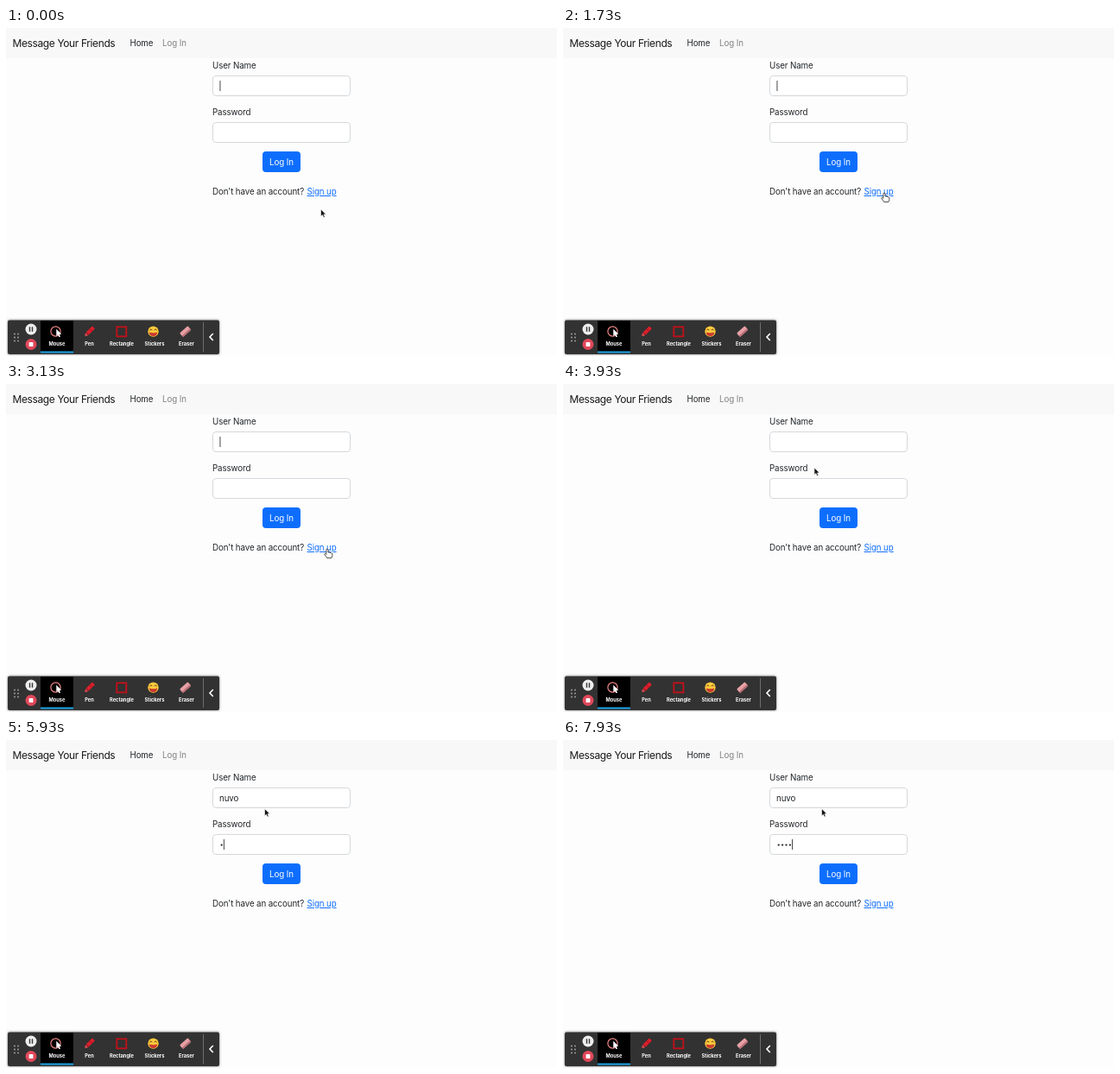
These frames come from a looping animation (638 px wide and 380 px high, 8000 ms). An HTML page:

```html
<!DOCTYPE html>
<html lang="en">
<head>
<meta charset="utf-8">
<title>Message Your Friends</title>
<style>
  html, body { margin: 0; width: 100%; height: 100%; overflow: hidden; background: #fdfdfd; }
  svg { display: block; width: 638px; height: 380px; }
  text { font: 9.75px Inter, "Liberation Sans", sans-serif; letter-spacing: -.11px; fill: #212529; }
  .brand { font-size: 12px; letter-spacing: -.38px; fill: #1a1a1a; }
  .link { fill: #0d6efd; text-decoration: underline; }
  .button rect { fill: #0d6efd; }
  .button text { fill: #fff; text-anchor: middle; }
  .field { fill: #fff; stroke: #d0d4d8; }
  .focus .field { stroke: #86b7fe; }
  .ring { fill: none; stroke: #c2d9fd; stroke-width: 3; visibility: hidden; }
  .focus .ring { visibility: visible; }
  .tools text { font-size: 5.7px; font-weight: 700; letter-spacing: 0; fill: #fff; text-anchor: middle; }
</style>
</head>
<body>
<svg viewBox="0 0 638 380">
  <defs>
    <filter id="shadow" x="-10%" y="-30%" width="120%" height="160%">
      <feDropShadow dx="0" dy="0" stdDeviation="1.5" flood-opacity=".5"/>
    </filter>
    <g id="field">
      <rect class="ring" x="-1.5" y="-1.5" width="163" height="27" rx="5"/>
      <rect class="field" x=".5" y=".5" width="159" height="23" rx="3.5" stroke-width=".9"/>
    </g>
    <path id="pointer" d="M0 0V8.3L1.9 6.5L3.2 9.4L4.7 8.7L3.4 5.9H6Z"/>
  </defs>

  <rect width="638" height="380" fill="#fdfdfd"/>
  <rect width="638" height="35" fill="#f8f8f8"/>
  <text class="brand" x="7.5" y="22">Message Your Friends</text>
  <text x="143.5" y="21.4">Home</text>
  <text x="181" y="21.4" style="fill:#808284">Log In</text>

  <text id="nameLabel" x="239" y="46.5"></text>
  <text x="239" y="100.5">Password</text>
  <g id="nameField" transform="translate(239 55)"><use href="#field"/></g>
  <g id="passField" transform="translate(239 109)"><use href="#field"/></g>
  <text id="name" x="247" y="70.6"></text>
  <g id="dots" fill="#212529"></g>
  <rect id="caret" width=".9" height="12" fill="#333"/>

  <g id="login">
    <g class="button">
      <rect x="297" y="143" width="44" height="24" rx="4"/>
      <text x="319" y="158.7">Log In</text>
    </g>
    <text x="239" y="193">Don't have an account?</text>
    <text class="link" x="348.5" y="193">Sign up</text>
  </g>
  <g id="signup">
    <g class="button">
      <rect x="293" y="143" width="52" height="24" rx="4"/>
      <text x="319" y="158.7">Sign Up</text>
    </g>
    <text x="239" y="193">Already have an account?</text>
    <text class="link" x="358.5" y="193">Log in</text>
  </g>

  <g class="tools">
    <rect x="2" y="338.5" width="245" height="39.5" rx="2" fill="#303030" filter="url(#shadow)"/>
    <path d="M10 354.5h0m4 0h0M10 358.5h0m4 0h0M10 362.5h0m4 0h0" stroke="#aaa" stroke-width="1.8" stroke-linecap="round"/>
    <circle cx="29" cy="349" r="6.5" fill="#eee"/>
    <path d="M27.5 346.3v5.4M30.5 346.3v5.4" stroke="#333" stroke-width="1.4"/>
    <circle cx="29" cy="366.5" r="6.5" fill="#e0485a"/>
    <rect x="26.6" y="364.1" width="4.8" height="4.8" rx=".6" fill="#fff"/>

    <rect x="40" y="339" width="38" height="37" fill="#000"/>
    <rect x="40" y="374.5" width="38" height="2" fill="#1ba0e2"/>
    <circle cx="57.5" cy="351.5" r="5.6" fill="none" stroke="#ef8585" stroke-width="1.2"/>
    <use href="#pointer" x="58.3" y="348.8" fill="#fff"/>

    <g transform="translate(96.5 351.8) rotate(-45)">
      <rect x="-3.5" y="-2.2" width="10.5" height="4.4" rx="1" fill="#d9202c"/>
      <path d="M-4 -2.2L-7.5 0L-4 2.2Z" fill="#e84a50"/>
      <path d="M-3.2 -2.2v4.4M2.5 -2.2v4.4" stroke="#8d0d16" stroke-width=".8"/>
    </g>
    <rect x="128.3" y="346.3" width="11" height="11" fill="none" stroke="#c3101a" stroke-width="1.8"/>

    <circle cx="170.5" cy="351.6" r="6.2" fill="#fbc93d"/>
    <path d="M165.8 352.5q4.7 1.6 9.4 0q-.6 4.6-4.7 4.6t-4.7-4.6Z" fill="#c8392f"/>
    <path d="M166.4 350q1.4-2 2.8 0M171.8 350q1.4-2 2.8 0" fill="none" stroke="#5a3510" stroke-width=".9"/>

    <g transform="translate(207.7 351.6) rotate(-42)">
      <rect x="-6.3" y="-3" width="12.6" height="6" rx="1.2" fill="#e7a0a5"/>
      <rect x="-6.3" y="1" width="12.6" height="2" rx="1" fill="#b96d75"/>
    </g>

    <text x="59" y="368">Mouse</text>
    <text x="96.5" y="368">Pen</text>
    <text x="134" y="368">Rectangle</text>
    <text x="172" y="368">Stickers</text>
    <text x="209" y="368">Eraser</text>
    <path d="M228.5 341v34" stroke="#777" stroke-width=".9"/>
    <path d="M239.8 354L236 358L239.8 362" fill="none" stroke="#fff" stroke-width="1.6"/>
  </g>

  <g id="cursor">
    <use id="arrow" href="#pointer" fill="#111" stroke="#fff" stroke-width=".6"/>
    <path id="hand" fill="#fff" stroke="#222" stroke-width=".8" stroke-linejoin="round"
      d="M-1.1 5.6V1Q-1 0 0 0T1 1V4Q2.5 3.5 3 4.4Q4.3 4 4.6 5Q5.8 4.8 5.8 6V7.6Q5.8 9 4.8 10.6H-.3Q-1 9-3 6.9Q-3.6 5.8-2.7 5.4Q-2 5.2-1.1 6.4Z"/>
    <path id="beam" fill="none" stroke="#333" stroke-width=".8" d="M-1.8-5Q0-5 0-4Q0-5 1.8-5M0-4V4M-1.8 5Q0 5 0 4Q0 5 1.8 5"/>
  </g>
</svg>
<script>
const LOOP = 8000, BLINK = 512, USER = "nuvo";
const pageTurns = [0, 660, 1530, 2200, 2930];   // login and sign-up alternate
const nameKeys = [5070, 5130, 5260, 5400];
const passKeys = [5920, 6120, 6400, 6590];
const TAB = 5660;
const path = [[0, 364.5, 210], [60, 364.5, 210], [600, 372, 191], [3440, 372, 191],
              [3930, 291, 97], [4330, 299.5, 79.7], [LOOP, 299.5, 79.7]];

const $ = id => document.getElementById(id);
const show = (id, on) => $(id).style.visibility = on ? "visible" : "hidden";
const within = (x, y, left, top, right, bottom) => x >= left && x <= right && y >= top && y <= bottom;
const passed = (times, t) => times.filter(k => k <= t);

const dots = passKeys.map((_, i) => {
  const dot = document.createElementNS("http://www.w3.org/2000/svg", "circle");
  dot.setAttribute("cx", 249.7 + 4.4 * i);
  dot.setAttribute("cy", 121.6);
  dot.setAttribute("r", 1.15);
  return $("dots").appendChild(dot);
});

function cursorAt(t) {
  const i = path.findIndex(p => p[0] > t);
  const [t0, x0, y0] = path[i - 1], [t1, x1, y1] = path[i];
  const u = (t - t0) / (t1 - t0), ease = u * u * (3 - 2 * u);
  return [x0 + (x1 - x0) * ease, y0 + (y1 - y0) * ease];
}

function drawCursor(t, onLogin) {
  const [x, y] = cursorAt(t);
  const half = onLogin ? 22 : 26;
  const hand = within(x, y, onLogin ? 348 : 358, 184, onLogin ? 383 : 386, 197)
            || within(x, y, 319 - half, 143, 319 + half, 167);
  const beam = within(x, y, 239, 55, 399, 79) || within(x, y, 239, 109, 399, 133);
  $("cursor").setAttribute("transform", `translate(${x} ${y})`);
  show("hand", hand);
  show("beam", beam);
  show("arrow", !hand && !beam);
}

function draw(t) {
  const turns = passed(pageTurns, t);
  const onLogin = turns.length % 2 === 1;
  const typedName = passed(nameKeys, t), typedPass = passed(passKeys, t);
  const onPass = t >= TAB;

  show("login", onLogin);
  show("signup", !onLogin);
  $("nameLabel").textContent = onLogin ? "User Name" : "Username";
  $("nameField").classList.toggle("focus", onLogin && !onPass);
  $("passField").classList.toggle("focus", onPass);
  $("name").textContent = USER.slice(0, typedName.length);
  dots.forEach((dot, i) => dot.style.visibility = i < typedPass.length ? "visible" : "hidden");

  // The blink restarts with every key press, tab and page turn.
  const lastInput = Math.max(...turns, ...typedName, ...typedPass, onPass ? TAB : 0);
  const lit = Math.floor((t - lastInput) / BLINK) % 2 === 0;
  const nameWidth = typedName.length ? $("name").getComputedTextLength() : 0;
  $("caret").setAttribute("x", 247.5 + (onPass ? 4.4 * typedPass.length : nameWidth));
  $("caret").setAttribute("y", onPass ? 115 : 61);
  show("caret", onLogin && lit);

  drawCursor(t, onLogin);
}

function tick() {
  draw(performance.now() % LOOP);
  requestAnimationFrame(tick);
}
tick();
</script>
</body>
</html>
```
